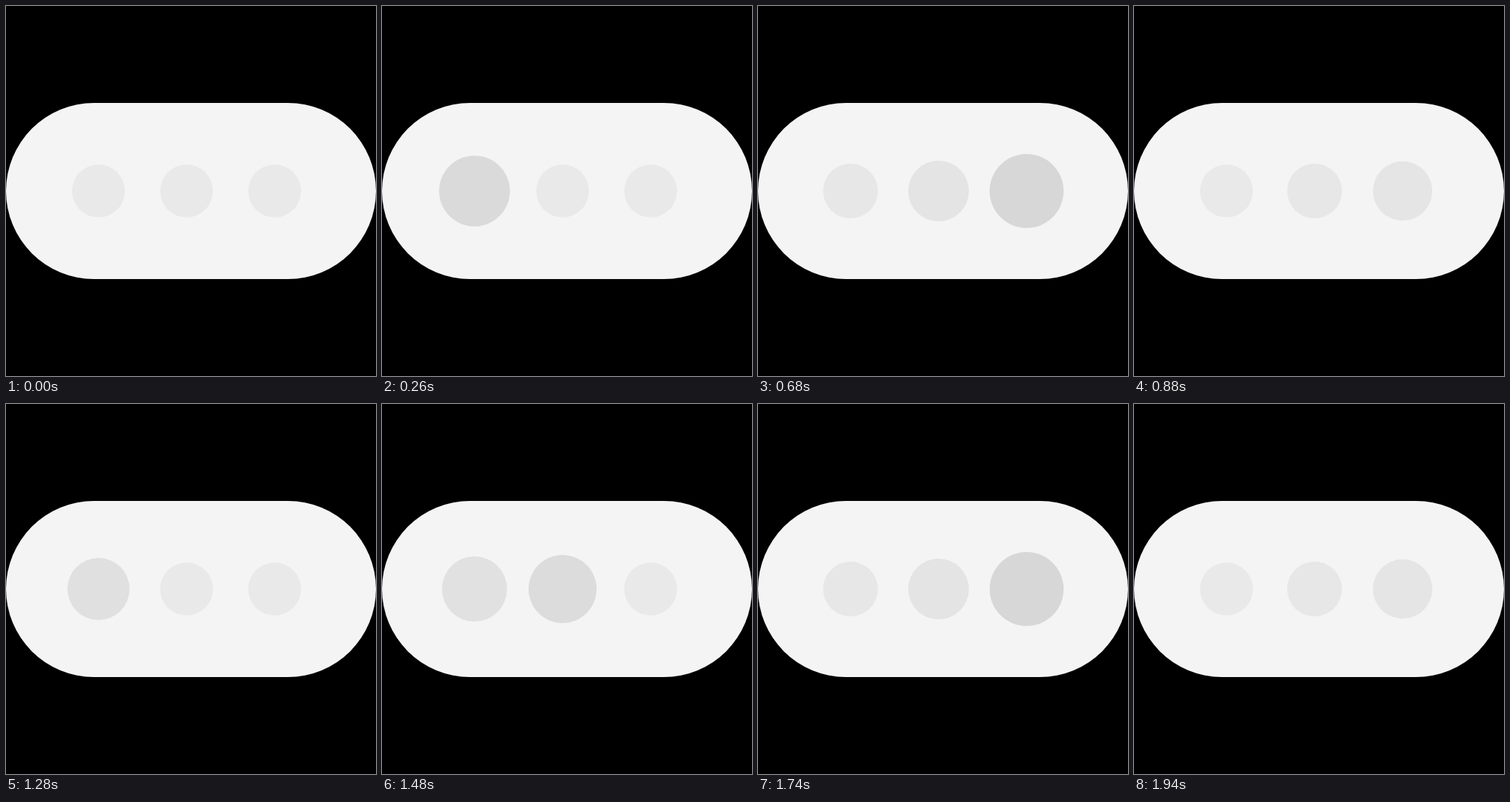
An HTML page for the animation above (2100 ms loop, 500 px wide and 500 px high).

```html
<!DOCTYPE html>
<html lang="en">
<head>
<meta charset="utf-8">
<title>Typing indicator</title>
<style>
  html, body { margin: 0; height: 100%; overflow: hidden; background: #000; }
  svg { display: block; width: 100%; height: 100%; }
</style>
</head>
<body>
<svg viewBox="0 0 500 500">
  <rect y="131" width="500" height="238" rx="119" fill="#f4f4f4"/>
  <circle cx="125" cy="250"/>
  <circle cx="244" cy="250"/>
  <circle cx="363" cy="250"/>
</svg>
<script>
  const LOOP = 2100, STEP = 20, START = 220, END = 880, REPEAT = 1060;
  const dots = [...document.querySelectorAll('circle')];
  const peaks = [295, 485, 672];
  const rest = [0, 35.7, 233];
  // time from the peak in ms, radius, grey level
  const pulse = [
    [-75, 42, 224], [-65, 46, 220], [0, 50, 215], [10, 50, 215],
    [68, 47, 220], [125, 44, 225], [195, 41, 228], [255, 37, 231],
    [420, 37, 231], [440, 35.7, 233]
  ];

  function pose(u) {
    const i = pulse.findIndex(k => k[0] > u);
    if (i < 1) return rest;
    const a = pulse[i - 1], b = pulse[i];
    const f = (u - a[0]) / (b[0] - a[0]);
    return a.map((v, j) => v + (b[j] - v) * f);
  }

  // each pass freezes at END until the next one begins
  function passTime(t) {
    const local = t < START + REPEAT ? t : t - REPEAT;
    return Math.min(local, END);
  }

  function draw(now) {
    const t = passTime(Math.floor(now % LOOP / STEP) * STEP);
    dots.forEach((dot, i) => {
      const [, r, grey] = t < START ? rest : pose(t - peaks[i]);
      const g = Math.round(grey);
      dot.setAttribute('r', r);
      dot.setAttribute('fill', `rgb(${g},${g},${g})`);
    });
  }

  let begin;
  function tick(now) {
    begin ??= now;
    draw(now - begin);
    requestAnimationFrame(tick);
  }
  draw(0);
  requestAnimationFrame(tick);
</script>
</body>
</html>
```
